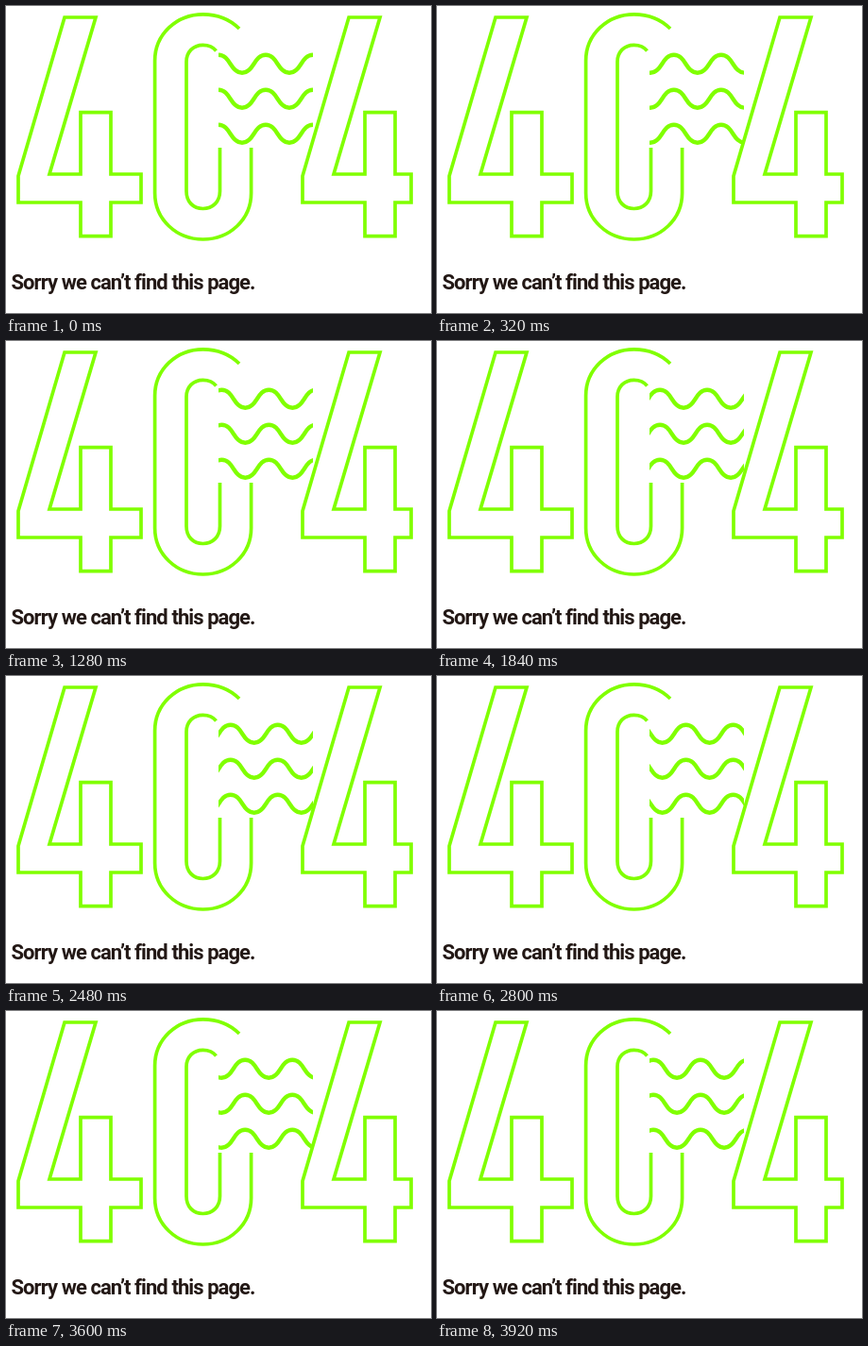
Recreate the animation shown at these times as an HTML page. Size 450 px wide and 325 px high, loop 4000 ms.

```html
<!DOCTYPE html>
<html lang="en">
<head>
<meta charset="utf-8">
<title>404</title>
<style>
  html, body { margin: 0; width: 100%; height: 100%; overflow: hidden; background: #fff; }
  svg { display: block; }
  .lines { fill: none; stroke: #80ff00; stroke-width: 3.7; }
  .waves { stroke-width: 4.4; }
  text { font: 700 22px Roboto, sans-serif; letter-spacing: -0.93px; fill: #231815; }
</style>
</head>
<body>
<svg width="450" height="325" viewBox="0 0 450 325">
  <defs>
    <clipPath id="window"><rect x="225" y="40" width="100" height="115"/></clipPath>
    <path id="wave"/>
  </defs>
  <g class="lines">
    <path d="M62 12H95L46 178H79V112.6H111V178H143V208H111V243.6H79V208H13V180Z"/>
    <path d="M363 12H396L347 178H380V112.6H412V178H429V208H412V243.6H380V208H314V180Z"/>
    <path d="M247 24C237 14 223 8.800 208.600 8.800C180.500 8.800 157.600 30 157.600 58V198C157.600 226 180.500 247 208.600 247S259.600 226 259.600 198V150"/>
    <path d="M222.500 47.500C219 43 214 41.300 208.500 41.300C198 41.300 191 49 191 59V196C191 207 198 214.500 208.500 214.500S226.500 207 226.500 196V150"/>
    <g class="waves" clip-path="url(#window)">
      <g id="waves">
        <use href="#wave" y="51.700"/>
        <use href="#wave" y="88.700"/>
        <use href="#wave" y="125.700"/>
      </g>
    </g>
  </g>
  <text x="5.500" y="300">Sorry we can’t find this page.</text>
</svg>
<script>
  const LOOP = 4000, STEP = 80, PERIOD = 50, SHIFT = 6.04;
  const waves = document.getElementById('waves');

  document.getElementById('wave').setAttribute('d',
    'M175 0' + 'c12.5 0 12.5 19 25 19s12.5 -19 25 -19'.repeat(4));

  function draw(now) {
    const step = Math.floor((now % LOOP) / STEP);
    const offset = PERIOD - (step * SHIFT) % PERIOD;
    waves.setAttribute('transform', `translate(${offset % PERIOD} 0)`);
  }

  const start = performance.now();
  function tick() {
    draw(performance.now() - start);
    requestAnimationFrame(tick);
  }
  tick();
</script>
</body>
</html>
```
